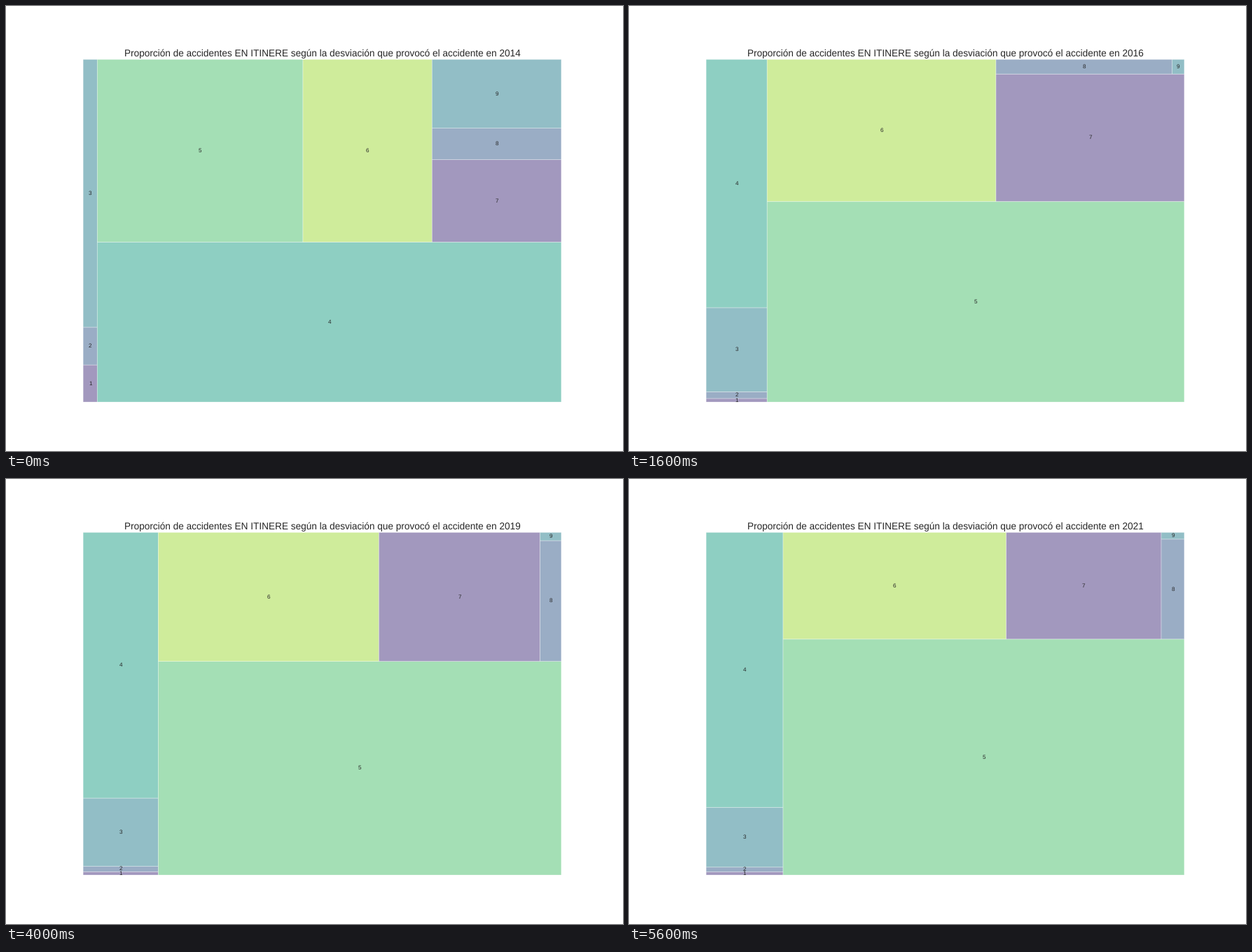
Write a matplotlib script that moves like this. It is 881 px wide and 636 px high and loops after 6400 ms.

```python
import numpy as np
import matplotlib.pyplot as plt
from matplotlib.animation import FuncAnimation
from matplotlib.patches import Rectangle

W, H, DPI = 881, 636, 64
INK = "#262626"
YEARS = range(2014, 2022)
TITLE = ("Proporción de accidentes EN ITINERE según la desviación "
         "que provocó el accidente en {}")

# Shares of causes 1 to 9 in percent: old coding, then first and last of the new
OLD = np.array([.32, .326, 2.31, 45.32, 22.926, 14.387, 6.504, 2.479, 5.427])
FIRST = np.array([.133, .25, 3.134, 9.24, 51.1, 19.83, 14.64, 1.572, .109])
LAST = np.array([.151, .22, 2.81, 12.914, 57.775, 14.531, 10.098, 1.406, .094])


def shares(year):
    if year < 2016:
        # the middle causes gain at the expense of the outer ones
        cause = np.arange(1, 10)
        s = OLD * (1.02 - 0.0065 * (cause - 5) ** 2) ** (year - 2014)
    else:
        # linear trend; causes 5 and 6 sag until 2020 and then recover
        s = FIRST + (LAST - FIRST) * (year - 2016) / 5
        sag = ((year - 2016) % 5 / 4) ** 2
        s[4:6] *= 1 - np.array([0.184, 0.036]) * sag
    return s / s.sum()


def strip(areas, x, y, dx, dy):
    """Stack areas in a column on the left, or in a row at the bottom."""
    tiles = []
    if dx >= dy:
        w = sum(areas) / dy
        for a in areas:
            tiles.append((x, y, w, a / w))
            y += a / w
    else:
        h = sum(areas) / dx
        for a in areas:
            tiles.append((x, y, a / h, h))
            x += a / h
    return tiles


def worst(areas, *box):
    return max(max(w / h, h / w) for _, _, w, h in strip(areas, *box))


def squarify(areas, x, y, dx, dy):
    if not areas:
        return []
    box = x, y, dx, dy
    n = 1
    while n < len(areas) and worst(areas[:n], *box) >= worst(areas[:n + 1], *box):
        n += 1
    total = sum(areas[:n])
    if dx >= dy:
        rest = x + total / dy, y, dx - total / dy, dy
    else:
        rest = x, y + total / dx, dx, dy - total / dx
    return strip(areas[:n], *box) + squarify(areas[n:], *rest)


def pt(px):
    return px * 72 / DPI


plt.rcParams.update({"font.family": "Liberation Sans", "text.hinting": "none",
                     "text.color": INK})
fig = plt.figure(figsize=(W / DPI, H / DPI), dpi=DPI, facecolor="white")
ax = fig.add_axes([0.125, 0.11, 0.775, 0.77])
ax.set(xlim=(0, 100), ylim=(0, 100))
ax.axis("off")
title = ax.set_title("", fontsize=pt(13.595), pad=pt(4.08), color=INK)

palette = plt.get_cmap("viridis")(np.linspace(0, 1, 8)[1:-1])
tiles, labels = [], []
for i in range(9):
    tile = Rectangle((0, 0), 1, 1, facecolor=palette[i % 6], edgecolor="white",
                     linewidth=pt(0.68), alpha=0.5, snap=False)
    tiles.append(ax.add_patch(tile))
    labels.append(ax.text(0, 0, str(i + 1), ha="center", va="center",
                          fontsize=pt(8.157)))


def update(frame):
    year = YEARS[frame]
    title.set_text(TITLE.format(year))
    boxes = squarify(list(shares(year) * 100 ** 2), 0, 0, 100, 100)
    for tile, label, (x, y, w, h) in zip(tiles, labels, boxes):
        tile.set_bounds(x, y, w, h)
        label.set_position((x + w / 2, y + h / 2))
    return [title, *tiles, *labels]


anim = FuncAnimation(fig, update, frames=len(YEARS), interval=800,
                     repeat=True, repeat_delay=0, blit=False)
plt.show()
```
